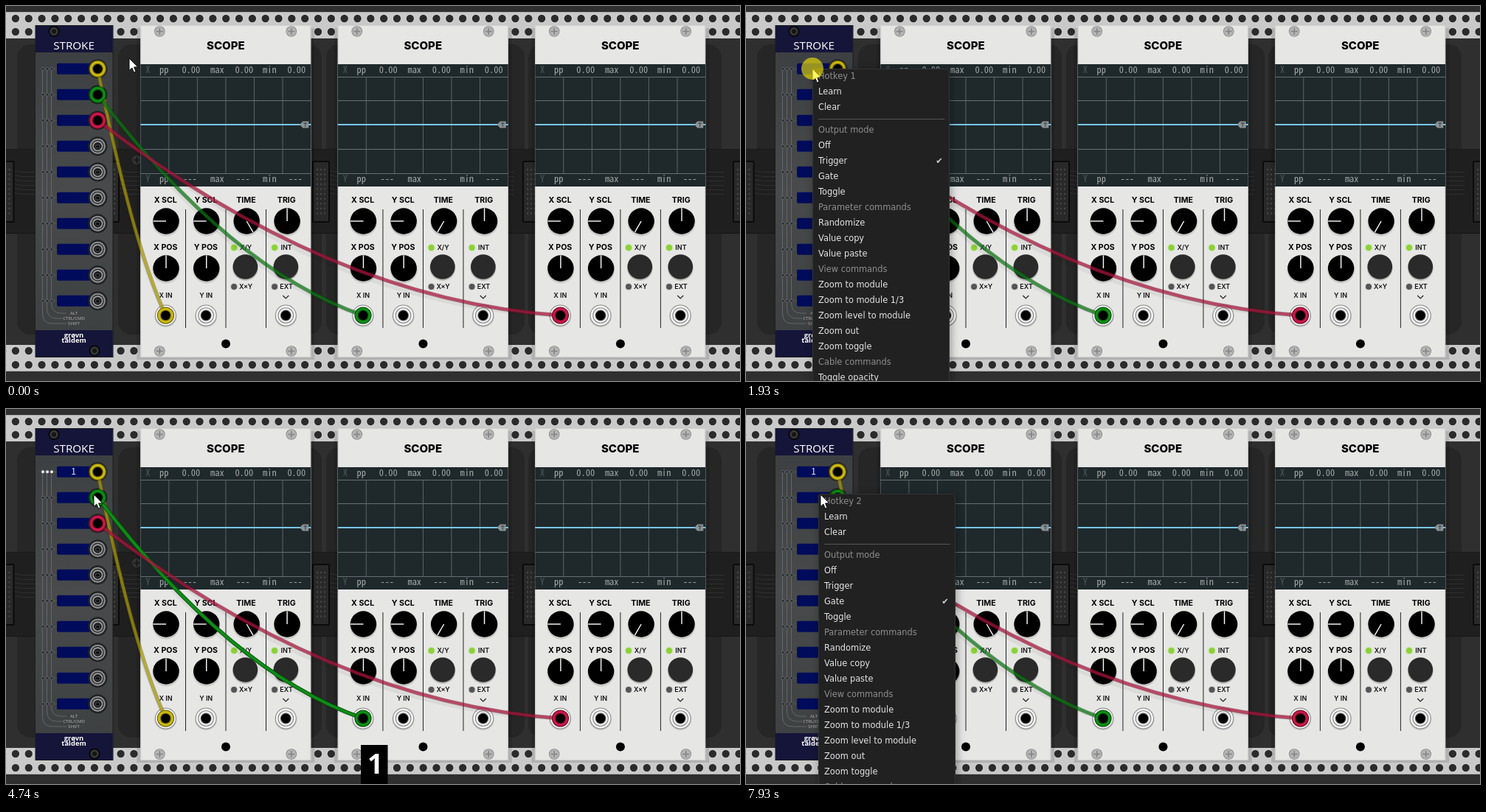
Animation of 995 by 509 pixels, one loop 7.99 s. Source, as an HTML page with a canvas:

```html
<!DOCTYPE html>
<html lang="en">
<head>
<meta charset="utf-8">
<title>Hotkey module demo</title>
<style>
html, body { margin: 0; width: 100%; height: 100%; overflow: hidden; background: #2f2f2f; }
canvas { display: block; }
</style>
</head>
<body>
<canvas id="stage" width="995" height="509"></canvas>
<script>
const W = 995, H = 509, LOOP = 7990;
const HP = 17.83, RACK_X = 182.3;
const SANS = 'Inter, sans-serif', HUMAN = '"Open Sans", sans-serif';
const MENU_FONT = '"DejaVu Sans", sans-serif';
const NARROW = '"Noto Sans Mono CJK JP", "Noto Sans Mono", monospace';
const screen = document.getElementById('stage').getContext('2d');
let g = screen;

// Drawing helpers
function rect(x, y, w, h, color) {
  g.fillStyle = color;
  g.fillRect(x, y, w, h);
}

function rounded(x, y, w, h, r, fill, stroke) {
  g.beginPath();
  g.roundRect(x, y, w, h, r);
  if (fill) { g.fillStyle = fill; g.fill(); }
  if (stroke) { g.strokeStyle = stroke; g.stroke(); }
}

function disc(x, y, r, color) {
  g.fillStyle = color;
  g.beginPath();
  g.arc(x, y, r, 0, Math.PI * 2);
  g.fill();
}

function line(points, color, width = 1) {
  g.strokeStyle = color;
  g.lineWidth = width;
  g.beginPath();
  points.forEach(([x, y]) => g.lineTo(x, y));
  g.stroke();
}

// y is the middle of the capital letters
function text(str, x, y, size, color, family = SANS, weight = 400, align = 'center') {
  g.font = `${weight} ${size}px ${family}`;
  g.textAlign = align;
  g.fillStyle = color;
  g.fillText(str, x, y + size * 0.36);
}

// Rack case
function drawCase() {
  rect(0, 0, W, H, '#2f2f2f');
  for (const [x1, x2] of [[15, 145], [152, 428], [434, 703], [708, 970]]) {
    rounded(x1, 52, x2 - x1, 160, 18, '#262626');
    rounded(x1, 292, x2 - x1, 154, 18, '#262626');
  }
  rect(0, 195, W, 113, '#1f1f1f');
  rect(0, 194, W, 1, '#191919');
  rect(0, 308, W, 1, '#151515');
  for (let x = -11.5; x < W; x += 142.5) {
    for (let i = 0; i < 6; i++) {
      line([[x + 22, 223.5 + i * 6], [x + 34, 225.5 + i * 6], [x + 130, 225.5 + i * 6]], '#303030');
    }
    g.lineWidth = 2;
    rounded(x, 211, 22, 82, 1, '#292929', '#0b0b0b');
    for (let col = 0; col < 3; col++)
      for (let row = 0; row < 10; row++) rect(x + 5 + col * 5, 221 + row * 6.6, 2, 2, '#4a4a4a');
  }
  screw(177, 209, '#333', '#1a1a1a');
  for (const [y, edge] of [[8, 8], [460, 495]]) {
    rect(0, y, W, 36, '#c9c9c9');
    rect(0, edge, W, 1, '#b0b0b0');
  }
  for (const y of [17, 35, 468, 487])
    for (let x = RACK_X - 10.5 * HP; x < W + 9; x += HP) {
      disc(x, y, 6, '#dedede');
      disc(x, y, 5.2, '#2b2b2b');
    }
}

function screw(x, y, color, mark) {
  disc(x, y, 7.3, mark);
  disc(x, y, 6.5, color);
  line([[x - 4.5, y], [x + 4.5, y]], mark, 1.6);
  line([[x, y - 4.5], [x, y + 4.5]], mark, 1.6);
}

// Hotkey module
const JACK_X = 124.3;
const rowY = i => 85.3 + 35 * i;

function drawHotkeyModule() {
  const shade = g.createLinearGradient(0, 63, 0, 440);
  shade.addColorStop(0, '#3d4042');
  shade.addColorStop(0.5, '#484a4b');
  shade.addColorStop(1, '#3e4142');
  rect(39.5, 26, 106, 451, '#1a1a1a');
  rect(40, 27, 104.5, 449, shade);
  rect(40, 27, 104.5, 36, '#15153a');
  rect(40, 440, 104.5, 36, '#15153a');
  for (const [x, y] of [[65, 34.5], [120, 468]]) {
    disc(x, y, 7.5, '#050505');
    disc(x, y, 5.7, '#383838');
    disc(x, y, 3, '#151515');
  }
  text('STROKE', 92, 54, 15.2, '#fff', HUMAN, 500);

  for (let i = 0; i < 3; i++) {
    const x = 61.5 - i * 6, y = 417 + i * 7;
    g.strokeStyle = '#6d7071';
    g.lineWidth = 0.8;
    g.beginPath();
    g.moveTo(x, 85);
    g.lineTo(x, y - 14);
    g.quadraticCurveTo(x, y, x + 13, y);
    g.lineTo(i === 1 ? 76 : 82, y);
    g.stroke();
    text(['ALT', 'CTRL/CMD', 'SHIFT'][i], 92, y, 6, '#b5b7b8', HUMAN);
  }
  for (let i = 0; i < 10; i++) {
    const y = rowY(i);
    line([[50, y], [69, y]], '#5b5e60', 0.7);
    for (let k = 0; k < 3; k++) {
      disc(50 + k * 6, y, 2.3, '#65686a');
      disc(50 + k * 6, y, 1.5, '#24272a');
    }
    rounded(69, y - 7.5, 46, 15, 2, '#000c5b');
    disc(JACK_X, y, 13, '#202223');
    disc(JACK_X, y, 10.6, '#8b8d8e');
    disc(JACK_X, y, 8.5, '#2c2e2f');
    disc(JACK_X, y, 7, '#a0a2a3');
    disc(JACK_X, y, 5.4, '#1c1d1e');
    rect(JACK_X - 3, y - 2, 6, 5, '#48494a');
    rect(JACK_X - 2, y - 1, 4, 3, '#070707');
  }
  text('grøvn', 92, 447, 9.4, '#fff', HUMAN, 700);
  text('taldem', 92, 454, 9.4, '#fff', HUMAN, 700);
}

// Scope module
function knob(x, y, angle) {
  disc(x, y + 2, 18.5, 'rgba(0,0,0,.13)');
  disc(x, y, 17.7, '#000');
  line([[x, y], [x + Math.cos(angle) * 17.5, y + Math.sin(angle) * 17.5]], '#fff', 1.4);
}

function led(x, y, color, label) {
  disc(x, y, 5, color === '#555' ? '#d0d0d0' : '#c8e5a0');
  disc(x, y, 4, color);
  text(label, x + 16, y, 9, '#111', SANS, 600);
}

function scopePort(x, y) {
  disc(x, y + 1, 15, 'rgba(0,0,0,.15)');
  disc(x, y, 14.4, '#888');
  disc(x, y, 13.5, '#f4f4f4');
  disc(x, y, 10.8, '#777');
  disc(x, y, 9.9, '#eee');
  disc(x, y, 7.4, '#666');
  disc(x, y, 6.5, '#000');
}

function drawScopeDisplay() {
  rect(0, 79, 231, 166, '#1f292b');
  for (const y of [96.5, 128.5, 194.5, 227.5]) line([[0, y], [231, y]], '#667073');
  for (let i = 1; i < 6; i++) line([[i * 38.55, 96], [i * 38.55, 227]], '#5b6568');
  line([[0, 161], [231, 161]], '#79c7f5', 2);
  const stats = [['pp', 32], ['max', 104], ['min', 175]];
  for (const [axis, y, value, shift] of [['X', 87, '0.00', 0], ['Y', 235, '---', -1.5]]) {
    text(axis, 10, y, 12.4, '#4d5659', NARROW);
    for (const [name, x] of stats) {
      text(name, x, y, 12.4, '#a4aaac', NARROW);
      text(value, x + 36.5 + shift, y, 12.4, '#a4aaac', NARROW);
    }
  }
  g.fillStyle = '#8c9396';
  g.beginPath();
  [[216, 161], [220, 156.5], [228, 156.5], [228, 165.5], [220, 165.5]].forEach(p => g.lineTo(...p));
  g.fill();
  line([[221, 159], [226, 159]], '#30393c');
  line([[223.5, 159], [223.5, 164]], '#30393c');
}

function drawScope(x, timeAngle) {
  const cols = [34.7, 89.4, 143.9, 198.8];
  const up = -Math.PI / 2;
  rect(x - 5, 30, 241, 450, 'rgba(0,0,0,.12)');
  g.save();
  g.translate(x, 0);
  rect(0, 26, 231, 451, '#e6e6e5');
  g.lineWidth = 1;
  g.strokeStyle = '#cfcfcf';
  g.strokeRect(0.5, 26.5, 230, 450);
  for (const sx of [26, 204.5]) for (const sy of [34.5, 468.5]) screw(sx, sy, '#b5b5b5', '#858585');
  text('SCOPE', 115.5, 54, 15, '#000', SANS, 800);
  drawScopeDisplay();
  for (const lx of [61.2, 115.7, 170.2]) line([[lx, 276], [lx, 437]], '#222');
  ['X SCL', 'Y SCL', 'TIME', 'TRIG'].forEach((s, i) => {
    text(s, cols[i] - 0.8, 263, 10.6, '#000', SANS, 700);
    knob(cols[i], 292, [Math.PI, Math.PI, timeAngle, up][i]);
  });
  ['X', 'Y'].forEach((s, i) => {
    text(s + ' POS', cols[i] - 0.8, 327.5, 10.6, '#000', SANS, 700);
    knob(cols[i], 356, up);
    text(s + ' IN', cols[i] - 0.5, 393, 9, '#111', SANS, 600);
    scopePort(cols[i] - 0.6, 420);
  });
  [['X/Y', 'X×Y', 126.8], ['INT', 'EXT', 181.8]].forEach(([upper, lower, lx]) => {
    led(lx, 328, '#8bd138', upper);
    led(lx, 381, '#555', lower);
    disc(lx + 15.3, 355.5, 17.4, 'rgba(0,0,0,.2)');
    disc(lx + 15.3, 354, 16.8, '#2a2a2a');
  });
  line([[193, 393], [197, 397], [201, 393]], '#222', 1.2);
  scopePort(197, 420);
  disc(115.7, 458.5, 6, '#000');
  g.restore();
}

// Cables
const cables = [
  { color: '#c9b70e', edge: '#655c07', from: [JACK_X, rowY(0)], to: [216.4, 420], sag: 66 },
  { color: '#0c8e15', edge: '#06470a', from: [JACK_X, rowY(1)], to: [484, 420], sag: 87 },
  { color: '#c91847', edge: '#650c24', from: [JACK_X, rowY(2)], to: [751.5, 420], sag: 111 }
];

function plug([x, y], { color, edge }) {
  disc(x, y, 11.6, edge);
  disc(x, y, 10.6, color);
  disc(x, y, 7.3, edge);
  disc(x, y, 6.2, '#000');
}

function drawCable({ color, edge, from, to, sag }, lit) {
  const [x1, y1] = from, [x2, y2] = to;
  const stroke = (style, width, alpha, drop = 0) => {
    g.globalAlpha = alpha;
    g.strokeStyle = style;
    g.lineWidth = width;
    g.beginPath();
    g.moveTo(x1, y1);
    g.quadraticCurveTo((x1 + x2) / 2, (y1 + y2) / 2 + sag + drop, x2, y2);
    g.stroke();
  };
  stroke('#000', 5, 0.05, 14);
  stroke(edge, 5.4, lit ? 1 : 0.5);
  stroke(color, 3.8, lit ? 1 : 0.5);
  g.globalAlpha = 1;
}

// Context menu; a leading # marks a heading
const menuItems = ['Learn', 'Clear', '#Output mode', 'Off', 'Trigger', 'Gate', 'Toggle',
  '#Parameter commands', 'Randomize', 'Value copy', 'Value paste', '#View commands',
  'Zoom to module', 'Zoom to module 1/3', 'Zoom level to module', 'Zoom out', 'Zoom toggle',
  '#Cable commands', 'Toggle opacity'];

function drawMenu({ x, y, title, checked }, [px, py]) {
  g.save();
  g.shadowColor = 'rgba(0,0,0,.35)';
  g.shadowBlur = 12;
  g.shadowOffsetX = g.shadowOffsetY = 2;
  rounded(x, y, 186, 500, 3, '#212121');
  g.restore();
  g.lineWidth = 1;
  rounded(x + 0.5, y + 0.5, 185, 500, 3, null, '#343434');
  rect(x + 8, y + 68, 171, 1, '#565656');
  ['#' + title, ...menuItems].forEach((item, i) => {
    const heading = item[0] === '#';
    const top = y + 21 * i + (i > 2 ? 10 : 0);
    if (!heading && px > x && py >= top && py < top + 21) rect(x, top, 186, 19.5, '#646464');
    text(heading ? item.slice(1) : item, x + 8, top + 10, 11.4, heading ? '#8e8e8e' : '#e4e4e4', MENU_FONT, 400, 'left');
    if (item === checked) text('✔', x + 172, top + 10, 11.4, '#d0d0d0', MENU_FONT);
  });
}

// Pointer: [time, x, y]
const path = [[0, 167, 71], [420, 167, 71], [1070, 118, 78], [1230, 106, 78], [1530, 90, 85],
  [3030, 90, 85], [3500, 119, 116], [5250, 119, 116], [5770, 98, 115], [7929, 98, 115], [7930, 101, 116], [LOOP, 101, 116]];

function pointerAt(t) {
  const i = path.findIndex(p => p[0] > t);
  const [t0, x0, y0] = path[i - 1], [t1, x1, y1] = path[i];
  const k = (t - t0) / (t1 - t0);
  return [x0 + (x1 - x0) * k, y0 + (y1 - y0) * k];
}

function drawPointer(x, y) {
  g.beginPath();
  [[0, 0], [0, 16.5], [3.8, 13], [6.4, 19], [9, 18], [6.5, 12], [11.6, 11.7]]
    .forEach(([dx, dy]) => g.lineTo(x + dx, y + dy));
  g.closePath();
  g.fillStyle = '#fff';
  g.fill();
  g.lineWidth = 0.9;
  g.strokeStyle = '#000';
  g.stroke();
}

const menus = [
  { start: 1930, end: 4190, x: 90, y: 85, title: 'Hotkey 1', checked: 'Trigger' },
  { start: 6060, end: LOOP, x: 98, y: 115, title: 'Hotkey 2', checked: 'Gate' }
];
const clicks = [[1930, 2080, 90, 85], [3960, 4130, 119, 116], [6060, 6150, 98, 115]];

function buildBackdrop() {
  const layer = document.createElement('canvas');
  layer.width = W;
  layer.height = H;
  g = layer.getContext('2d');
  drawCase();
  drawHotkeyModule();
  for (let i = 0; i < 3; i++) drawScope(RACK_X + i * 15 * HP, Math.PI * (i ? 2 / 3 : 1 / 3));
  g = screen;
  return layer;
}

const backdrop = buildBackdrop();

function render(t) {
  const pointer = pointerAt(t), [px, py] = pointer;
  const menu = menus.find(m => t >= m.start && t < m.end);
  g.drawImage(backdrop, 0, 0);

  if (t >= 4190 && t < 4830) for (let k = 0; k < 3; k++) disc(50 + k * 6, rowY(0), 2, '#e2e4e5');
  if (t >= 4740) text('1', 91.5, rowY(0) - 0.5, 12.4, '#dfe3f2', NARROW);

  for (const c of cables) {
    const hovered = !menu && px > 104 && px < 138 && Math.abs(py - c.from[1]) < 13;
    drawCable(c, hovered);
  }
  for (const c of cables) {
    plug(c.from, c);
    plug(c.to, c);
  }
  if (menu) drawMenu(menu, pointer);
  if (t >= 4740 && t < 5530) {
    rect(481, 456, 36.5, 53, '#000');
    text('1', 500.5, 482, 37, '#fff', HUMAN, 700);
  }
  drawPointer(px, py);
  for (const [start, end, x, y] of clicks)
    if (t >= start && t < end) disc(x, y, 15, 'rgba(255,238,0,.6)');
}

function tick() {
  render(performance.now() % LOOP);
  requestAnimationFrame(tick);
}
tick();
</script>
</body>
</html>
```
